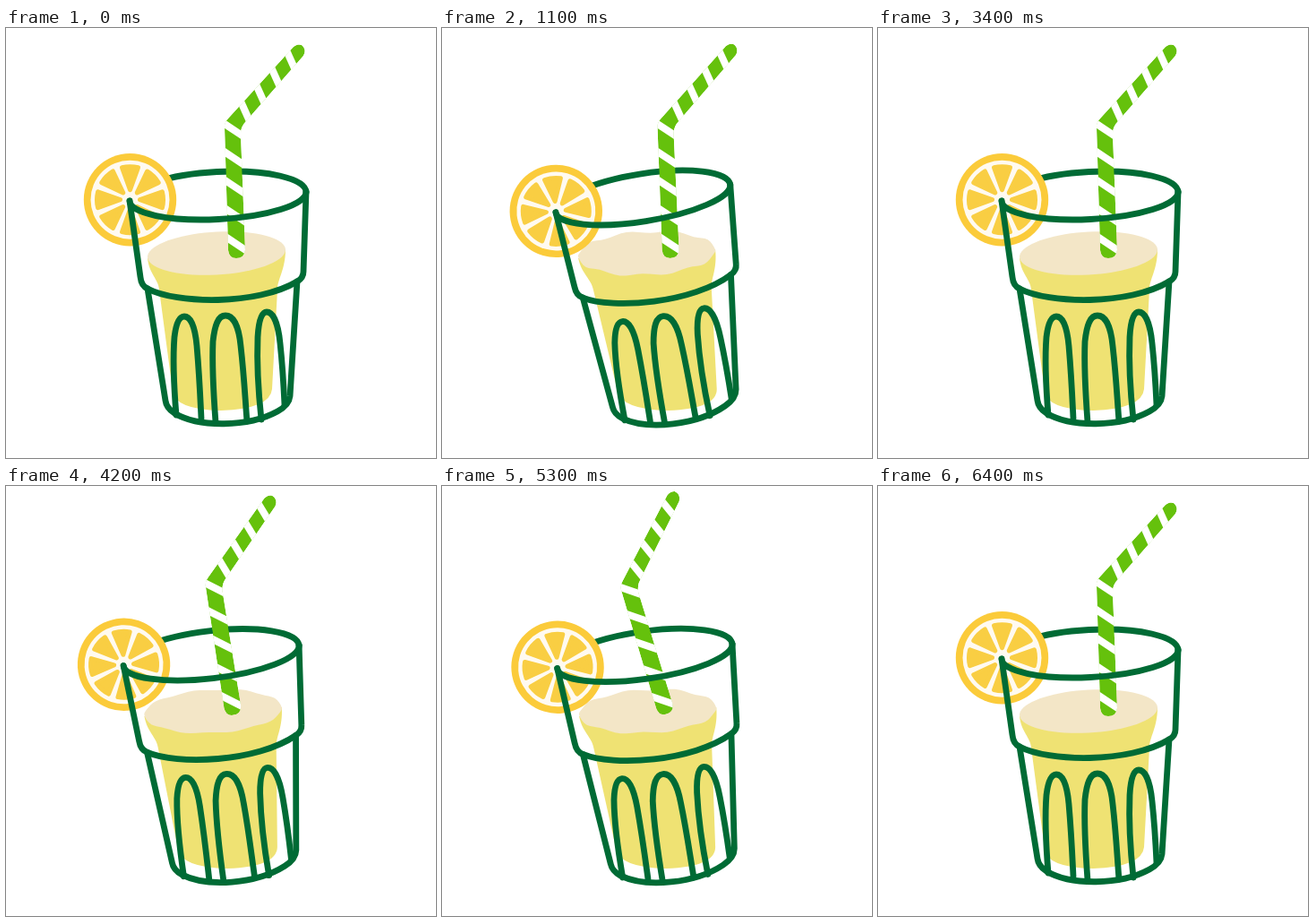
Animation, 480 px wide and 480 px high, one loop 6500 ms. Source, as an HTML page:

```html
<!DOCTYPE html>
<html lang="en">
<head>
<meta charset="utf-8">
<title>Lemonade</title>
<style>
  html, body { margin: 0; width: 100%; height: 100%; overflow: hidden; background: #fff; }
  svg { display: block; width: 100vw; height: 100vh; }
  .line { fill: none; stroke: #006b35; stroke-width: 6.8; stroke-linecap: round; stroke-linejoin: round; }
</style>
</head>
<body>
<svg viewBox="0 0 480 480">
  <clipPath id="tube">
    <path id="outline" d="M248 248L244 112Q243 106 248 101L319 23Q324 17 330 19Q336 24 332 31L268 104Q262 110 262 118L267 248Q266 257 257 257Q249 257 248 248Z"/>
  </clipPath>
  <g class="glass">
    <path class="line" d="M138 193A98.6 27.5 -3 0 1 335 183"/>
  </g>
  <g id="liquid">
    <path fill="#efe273" d="M158 257C160 275 170 280 171 292L186 405Q188 426 240 427Q295 425 297 403L303 292C303 280 312 270 312 247Z"/>
    <path id="surface" fill="#f3e6c7"/>
  </g>
  <g id="straw" clip-path="url(#tube)">
    <use href="#outline" fill="#65c10c"/>
    <g id="gaps" stroke="#fff" stroke-width="8"/>
  </g>
  <g class="glass">
    <g transform="translate(138.5 191.7)">
      <circle r="51.7" fill="#fbcb3a"/>
      <circle r="44" fill="#fffaf0"/>
      <g id="segments" fill="#f9ce43" stroke="#f9ce43" stroke-width="5" stroke-linejoin="round"/>
    </g>
    <g class="line">
      <path d="M138 193A98.6 25.5 -3 0 0 335 183"/>
      <path d="M138 193L150 278Q151 288 158 291C190 308 280 310 325 283Q332 279 332 272L335 183"/>
      <path d="M158 291L178 416Q179 424 188 430C215 446 270 446 303 428Q316 421 317 411L325 283"/>
      <path d="M190 432C187 395 186 370 188 345C190 328 194 322 199 322C206 322 211 333 213 355C216 390 217 415 218 436"/>
      <path d="M234 440C231 400 230 375 231 350C233 331 237 321 245 321C254 321 260 334 262 355C266 390 267 415 269 439"/>
      <path d="M285 437C281 400 280 370 281 345C282 327 285 317 291 317C299 317 304 332 306 352C309 380 310 400 311 421"/>
    </g>
  </g>
</svg>
<script>
const LOOP = 6500, STEP = 100, SECOND_BOUT = 4000;
const RAD = Math.PI / 180;
const byId = id => document.getElementById(id);

const ease = p => (1 - Math.cos(Math.PI * Math.min(1, Math.max(0, p)))) / 2;

// Ease out to the left, swing through four extremes, then settle.
function rock(t, { lead, half, settle }) {
  const end = lead + 3 * half;
  if (t < lead) return -ease(t / lead);
  if (t < end) return -Math.cos(Math.PI * (t - lead) / half);
  return 1 - ease((t - end) / settle);
}
const glassRock = { lead: 430, half: 380, settle: 400 };
const strawRock = { lead: 420, half: 450, settle: 400 };

function addPath(parent, d) {
  const path = document.createElementNS('http://www.w3.org/2000/svg', 'path');
  path.setAttribute('d', d);
  parent.append(path);
}

const polar = (r, deg) => `${r * Math.cos(deg * RAD)} ${r * Math.sin(deg * RAD)}`;
for (let mid = 0; mid < 360; mid += 45) {
  addPath(byId('segments'), `M${polar(11, mid)}L${polar(37, mid - 14)}A37 37 0 0 1 ${polar(37, mid + 14)}Z`);
}

const addGap = (x, y, dx, dy) => addPath(byId('gaps'), `M${x - dx} ${y - dy}l${2 * dx} ${2 * dy}`);
for (let i = 0; i < 5; i++) addGap(253 + i, 113 + 32 * i, 18, 12);
for (let i = 0; i < 4; i++) addGap(267 + 17 * i, 93 - 19 * i, 9, 20);

function surfacePath(tilt) {
  const swell = Math.abs(tilt) / 5.5;
  const points = [];
  for (let deg = 0; deg < 360; deg += 5) {
    const c = Math.cos(deg * RAD);
    const x = 235 + 77 * c;
    const ripple = 1.3 * swell * Math.sin((9 * deg + 135) * RAD);
    const y = 251.5 + 24 * Math.sin(deg * RAD) - 4 * c + ripple;
    points.push(x.toFixed(2) + ' ' + y.toFixed(2));
  }
  return 'M' + points.join('L') + 'Z';
}

const glassParts = document.querySelectorAll('.glass');
const liquid = byId('liquid'), surface = byId('surface'), straw = byId('straw');

function draw(t) {
  const second = t >= SECOND_BOUT;
  const time = second ? t - SECOND_BOUT : t;
  const tilt = 8.3 * rock(time, glassRock);
  const swing = (second ? 15 : 13) * rock(time, strawRock);
  glassParts.forEach(part => part.setAttribute('transform', `rotate(${tilt} 252 303)`));
  liquid.setAttribute('transform', `translate(0 312) skewX(${-tilt}) translate(0 -312)`);
  surface.setAttribute('d', surfacePath(tilt));
  straw.setAttribute('transform', `translate(${0.35 * tilt} 0) rotate(${swing} 246 275)`);
}

const start = performance.now();
function tick() {
  const t = (performance.now() - start) % LOOP;
  draw(Math.floor(t / STEP) * STEP);
  requestAnimationFrame(tick);
}
tick();
</script>
</body>
</html>
```
